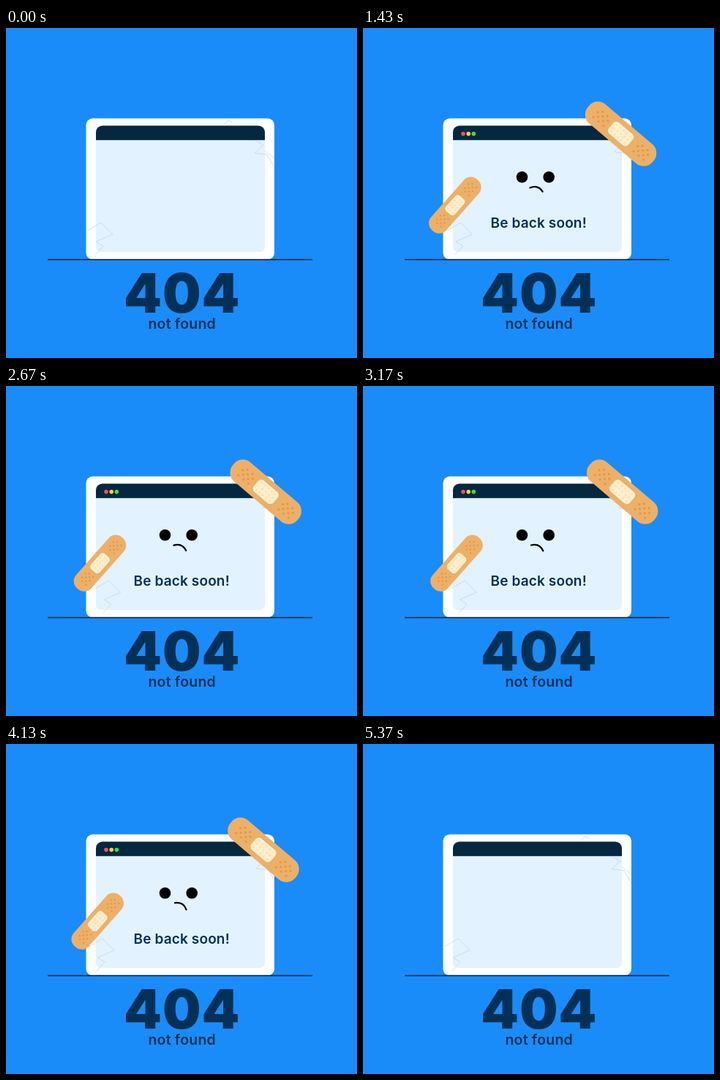
An HTML page that plays this animation: 480 px wide and 451 px high, repeating every 5410 ms.

```html
<!DOCTYPE html>
<html lang="en">
<head>
<meta charset="utf-8">
<title>404 not found</title>
<style>
  html, body { margin: 0; width: 100%; height: 100%; overflow: hidden; background: #198cfa; }
  svg { display: block; width: 480px; height: 451px; }
  text { font-family: Inter, Lato, sans-serif; text-anchor: middle; fill: #033056; }
</style>
</head>
<body>
<svg viewBox="0 0 480 451">
  <defs>
    <clipPath id="frame"><rect x="109.5" y="123.5" width="257.5" height="193" rx="9"/></clipPath>
    <pattern id="holes" width="9" height="9" patternUnits="userSpaceOnUse" patternTransform="translate(-.5 -4.5)">
      <circle cx="2.25" cy="2.25" r="1.5" fill="#d5964b"/>
      <circle cx="6.75" cy="6.75" r="1.5" fill="#d5964b"/>
    </pattern>
    <pattern id="weave" x="-3" y="-3" width="6" height="6" patternUnits="userSpaceOnUse">
      <circle cx="3" cy="3" r=".8" fill="#e6c68c"/>
    </pattern>
    <g id="plaster">
      <rect x="-58" y="-17.2" width="116" height="34.4" rx="16" fill="#eeb067"/>
      <rect x="-45.5" y="-9" width="22.5" height="18" fill="url(#holes)"/>
      <rect x="26.5" y="-9" width="22.5" height="18" fill="url(#holes)"/>
      <rect x="-18" y="-10.5" width="36" height="21" rx="6" fill="#feeecb" stroke="#dda55d" stroke-width=".7"/>
      <rect x="-15" y="-9" width="30" height="18" fill="url(#weave)"/>
    </g>
  </defs>

  <rect width="480" height="451" fill="#198cfa"/>
  <rect x="109.5" y="123.5" width="257.5" height="193" rx="9" fill="#fefeff"/>
  <rect x="123" y="133.4" width="231" height="172.6" rx="7" fill="#e3f2ff"/>
  <path d="M123 153.3V142.4a9 9 0 0 1 9-9h213a9 9 0 0 1 9 9v10.9z" fill="#04283f"/>
  <g clip-path="url(#frame)" fill="none" stroke="#a9c0d8" stroke-width=".7" opacity=".65">
    <path id="crackL" d="M111 277L130 266L146 282L123 292L133 298L122 310"/>
    <path id="crackR" d="M341 154L352 160L340 171L357 173L362 182L367 190M354 168L367 178M298 132L304 126L309 129"/>
  </g>
  <path d="M57 316.5H419" stroke="#0b1f33" stroke-width="1.4"/>

  <g id="dots">
    <circle cx="137" cy="144.6" r="2.8" fill="#fb4d5e"/>
    <circle cx="144.2" cy="144.6" r="2.8" fill="#fccf4b"/>
    <circle cx="151.3" cy="144.6" r="2.8" fill="#52d43c"/>
  </g>
  <circle id="eyeL" r="7.8"/>
  <circle id="eyeR" r="7.8"/>
  <path id="mouth" d="M-9 -8Q0 -15.5 9 -8" fill="none" stroke="#000" stroke-width="2.3" stroke-linecap="round"/>
  <text id="note" x="240.2" y="272.6" font-size="19" font-weight="600" letter-spacing=".15">Be back soon!</text>
  <use id="plasterL" href="#plaster"/>
  <use id="plasterR" href="#plaster"/>

  <text x="240.8" y="388.7" font-size="74" font-weight="900" letter-spacing="1">404</text>
  <text x="240.7" y="411.2" font-size="19.5" font-weight="600" letter-spacing=".2">not found</text>
</svg>
<script>
const LOOP = 5410;
const $ = id => document.getElementById(id);
const ramp = (t, a, b) => Math.min(1, Math.max(0, (t - a) / (b - a)));
const easeOut = p => 1 - (1 - p) ** 2;
const easeInOut = p => (1 - Math.cos(Math.PI * p)) / 2;

// Rises over [a, b] and falls over [c, d].
const pulse = (t, a, b, c, d) => easeOut(ramp(t, a, b)) * (1 - easeInOut(ramp(t, c, d)));

function place(id, x, y, angle = 0, scale = 1) {
  $(id).setAttribute('transform', `translate(${x} ${y}) rotate(${angle}) scale(${scale})`);
}

function draw(t) {
  const size = pulse(t, 0, 1130, 4680, 5370);
  const sway = 4 * Math.sin(Math.PI * ramp(t, 630, 4710)) ** 2;
  place('plasterR', 351.2 + sway, 144.7, 40.4, size);
  place('plasterL', 124.5 + sway, 242.2 - 10 * (1 - size), -48.5, size * .8);
  place('crackL', 2.7 * sway, 0);
  place('crackR', 2.7 * sway, -1.3 * sway);

  place('eyeL', 217.5, 203.7, 0, pulse(t, 250, 550, 4950, 5330));
  place('eyeR', 254.2, 203.7, 0, pulse(t, 650, 950, 4950, 5330));

  const swing = 97 * (1 - ramp(t, 0, 1130)) ** 2;
  place('mouth', 234.7, 228.6, 9.8 + t * .005 - swing);
  $('mouth').style.opacity = pulse(t, 300, 580, 5050, 5350);
  $('note').style.opacity = pulse(t, 100, 500, 5050, 5360);
  $('dots').style.opacity = pulse(t, 30, 400, 5050, 5360);
}

function tick() {
  draw(performance.now() % LOOP);
  requestAnimationFrame(tick);
}
tick();
</script>
</body>
</html>
```
